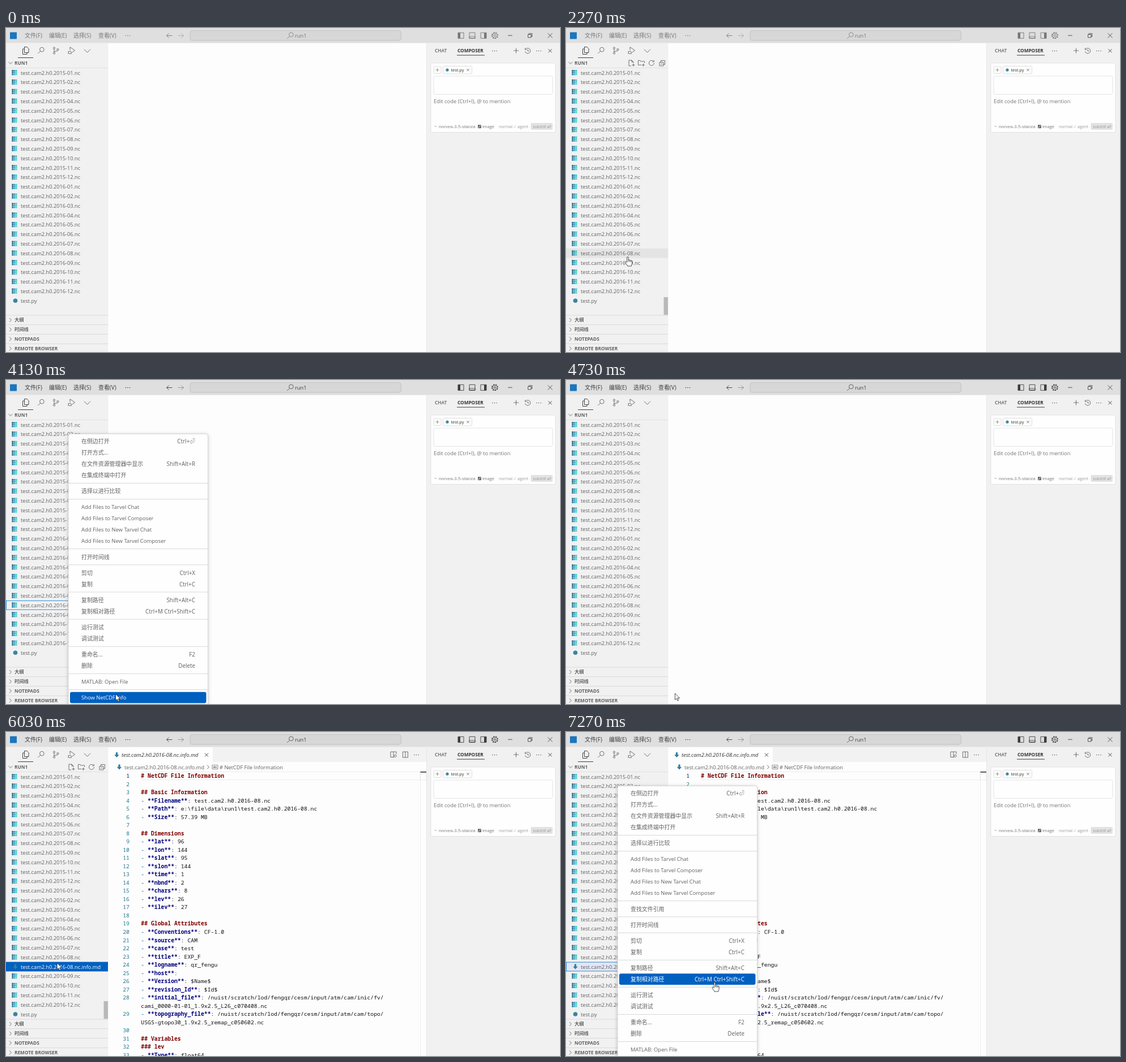
These frames come from a looping animation (978x573 px, 7.8 s). An HTML page:

```html
<!DOCTYPE html>
<html lang="zh">
<head>
<meta charset="utf-8">
<title>run1</title>
<style>
html, body { margin: 0; width: 100%; height: 100%; overflow: hidden; background: #fdfdfd; }
svg { display: block; width: 100vw; height: 100vh; color: #616161;
  font-family: "Open Sans", "Noto Sans CJK SC", "Noto Sans CJK", sans-serif; }
text { white-space: pre; fill: currentColor; }
path { stroke: currentColor; }
.mono text { font-family: "Noto Sans Mono", "DejaVu Sans Mono", monospace; color: #111; }
.head { font-weight: 700; fill: #800000; }
.key { font-weight: 700; fill: #000080; }
.dash { fill: #0451a5; }
.menu { filter: drop-shadow(0 1px 3px rgba(0, 0, 0, .2)); }
.item rect { fill: none; }
.item.on rect { fill: #0060c0; }
.item.on { color: #fff; }
</style>
</head>
<body>
<svg id="stage" viewBox="0 0 978 573">
  <defs>
    <g id="grid"></g>
    <path id="down" d="M-1.6-4.5H1.6V-.3H4.3L0 4.4-4.3-.3H-1.6z" fill="#2f7f9f" style="stroke:none"/>
  </defs>
</svg>
<script>
const LOOP = 7800, PITCH = 16.8, LINE = 14.52;

// ---------- drawing helpers (y is the middle of the text) ----------
const text = (x, y, s, size = 9.25, extra = '') =>
  `<text x="${x}" y="${y + size * .36}" font-size="${size}" ${extra}>${s}</text>`;
const rect = (x, y, w, h, fill, extra = '') =>
  `<rect x="${x}" y="${y}" width="${w}" height="${h}" fill="${fill}" ${extra}/>`;
const icon = (x, y, d, extra = '') =>
  `<path transform="translate(${x} ${y})" d="${d}" fill="none" stroke-width=".9" ${extra}/>`;
const ring = (x, y, r) => `M${x - r} ${y}a${r} ${r} 0 1 0 ${2 * r} 0a${r} ${r} 0 1 0 ${-2 * r} 0`;
const dots = (x, y) => [-3.6, 0, 3.6].map(d =>
  `<circle cx="${x + d}" cy="${y}" r=".8" fill="currentColor"/>`).join('');
const group = (id, body, extra = '') => `<g id="${id}" ${extra}>${body}</g>`;
const rowY = i => 79 + PITCH * i;
const BOLD = 'font-weight="700"', PALE = 'stroke="#d9d9d9"';

const D = {
  right: 'M-2-3.5L1.5 0-2 3.5',
  down: 'M-3.5-2L0 1.5 3.5-2',
  cross: 'M-3-3L3 3M3-3L-3 3',
  plus: 'M-4.5 0H4.5M0-4.5V4.5',
  lens: ring(1.4, -1.4, 3.8) + 'M-1.3 1.3L-5.8 5.8',
  files: 'M-2-6.5H2.5L5.5-3.5V3.5H-2zM-2-3H-5V6.5H2.5V3.5',
  branch: ring(-3, -4.5, 1.6) + ring(-3, 4.5, 1.6) + ring(3.4, -2, 1.6) + 'M-3-2.9V2.9M3.4-.4C3.4 2-3 0-3 2.9',
  debug: 'M-2-1V-6.3L6.5-.3 1.5 3.2' + ring(-2.2, 3.3, 2.4) + 'M-6 1.4L-4.3 2.4M-6 5.6L-4.3 4.4M1.4 5.6L0 4.4',
  newFile: 'M1-5H-4V5H0M1-5L4-2V0M1-5V-2H4M4 1V6M1.5 3.5H6.5',
  newFolder: 'M0 3.5H-5.5V-4.5H-2L-1-3H5.5V0M3.5 1V6M1 3.5H6',
  refresh: 'M3.8-2.5A4.5 4.5 0 1 0 4.5 0M4.3-5V-2.2H1.5',
  collapse: 'M-4.5-1.5H2.5V5H-4.5zM-2-1.5V-4.5H5V2.5H2.5M-2.5 1.7H.8',
  box: 'M-5-5H5V5H-5z',
  history: 'M-4-2.5A4.7 4.7 0 1 1-4.6 1M-4.6-5V-2.2H-1.8M0-2.6V.4H2.4',
};

// ---------- static chrome ----------
const title = () => {
  let s = [['文件(F)', 33], ['编辑(E)', 76], ['选择(S)', 119], ['查看(V)', 163]]
    .map(([l, x]) => text(x, 13.8, l, 9.93)).join('') + dots(215, 13.5);
  s += icon(288.5, 13.5, 'M5 0H-5M-1-4L-5 0-1 4') + icon(308.5, 13.5, 'M-5 0H5M1-4L5 0 1 4', 'opacity=".5"');
  s += rect(325, 4.5, 372.5, 17.5, '#d7d7d7', 'stroke="#bcbcbc" stroke-width=".8" rx="4"');
  s += icon(502, 13.2, D.lens, 'opacity=".85"') + text(510, 13.8, 'run1', 9.4);
  [803, 823, 843].forEach((x, i) => {
    s += icon(x, 13.3, D.box) + rect(...[[x - 5, 8.3, 4, 10], [x - 5, 14.8, 10, 3], [x + 1, 8.3, 4, 10]][i],
      i === 1 ? 'none' : 'currentColor', i === 1 ? 'stroke="currentColor" stroke-width=".8"' : '');
  });
  s += icon(863, 13.3, ring(0, 0, 1.7) + ring(0, 0, 4.2)) +
    icon(863, 13.3, ring(0, 0, 5.2), 'style="stroke-width:1.6;stroke-dasharray:2 2.08"');
  return s;
};

const windowButtons = icon(890, 13.2, 'M-3.8 0H3.8') +
  icon(925, 13.3, 'M-3.5-1.8H2V3.5H-3.5zM-1.8-1.8V-3.5H3.7V1.8H2') + icon(960.5, 13.3, 'M-4-4L4 4M4-4L-4 4');

const sideHead = icon(34.5, 40, D.files, 'style="color:#333"') + rect(21, 52, 27, 1, '#424242') +
  icon(62, 39.5, D.lens) + icon(88, 40, D.branch) + icon(115, 40, D.debug) +
  icon(143.5, 40.5, 'M-5.5-2.8L0 2.8 5.5-2.8') +
  icon(8, 62, D.down) + text(15, 62, 'RUN1', 8.3, BOLD) + rect(0, 70, 180, .8, '#dedede');

const sections = ['大纲', '时间线', 'NOTEPADS', 'REMOTE BROWSER'].map((l, i) => {
  const y = 516.4 + i * 16.8;
  return rect(0, y - 8.8, 180, .8, '#d4d4d4') + icon(8, y, D.right) + text(15, y, l, 8.3, BOLD);
}).join('');

const fileRow = (i, name) => `<use href="#grid" x="15" y="${rowY(i)}"/>` + text(26, rowY(i) + .3, name);
const names = Array.from({ length: 24 }, (_, i) =>
  `test.cam2.h0.${2015 + Math.floor(i / 12)}-${String(i % 12 + 1).padStart(2, '0')}.nc`);
const rows = from => names.map((n, i) => (from ? i >= 20 : i < 20) ? fileRow(i, n) : '').join('');
const pyRow = `<circle cx="16.5" cy="${rowY(24)}" r="3.8" fill="#3f81a5"/>` + text(26, rowY(24) + .3, 'test.py');
const INFO = 'test.cam2.h0.2016-08.nc.info.md';
const infoRow = `<use href="#down" x="16.5" y="${rowY(20)}"/>` + text(26, rowY(20) + .3, INFO);

const panel = rect(742, 27, 236, 546, '#f1f1f1') + rect(742, 27, .8, 546, '#e4e4e4') +
  text(757, 40.5, 'CHAT', 8.3, 'font-weight="600"') +
  text(797, 40.5, 'COMPOSER', 8.25, BOLD + ' fill="#333" style="color:#333"') +
  rect(796, 47.6, 49, 1, '#424242') + dots(862.5, 40.5) + icon(900.5, 40, D.plus) +
  icon(921, 40.3, D.history) + dots(940.5, 40.5) + icon(960.5, 40.3, D.cross, 'style="color:#333"') +
  rect(750, 62, 220, 122.5, '#fefefe', 'stroke="#dcdcdc" stroke-width=".8" rx="2"') +
  rect(755, 68, 13, 12.5, 'none', 'stroke="#d4d4d4" stroke-width=".8" rx="2"') +
  icon(761.5, 74.2, 'M-3 0H3M0-3V3', 'style="color:#888"') +
  rect(771.5, 67.5, 51, 13.5, 'none', 'stroke="#d4d4d4" stroke-width=".8" rx="2"') +
  '<circle cx="779" cy="74.2" r="2.6" fill="#3f8a9c"/>' +
  text(785.5, 74.3, 'test.py', 7.4, 'style="color:#333"') + icon(815.5, 74.2, 'M-2-2L2 2M2-2L-2 2') +
  rect(755, 85, 210, 32.5, 'none', 'stroke="#dedede" stroke-width=".8" rx="3"') +
  text(755, 129.5, 'Edit code (Ctrl+I), @ to mention', 9.4, 'style="color:#747474"') +
  '<g style="color:#999">' + icon(758.5, 174, 'M-2-1L0 1 2-1') +
  text(764, 173.8, 'norvea-3.5-stanza', 8, 'font-family="Liberation Sans, sans-serif" style="color:#858585"') +
  rect(833, 171.2, 6, 6, '#666', 'rx="1"') +
  icon(836, 174.2, 'M-2 1.8L2-1.8', 'style="color:#fff"') +
  text(841, 174.2, 'image', 7.3, 'style="color:#777"') + text(870, 174.2, 'normal', 7.2) +
  text(897, 174.2, '/', 7.2) + text(903, 174.2, 'agent', 7.2) +
  rect(926.5, 168, 38.5, 12, '#e2e2e2', 'rx="2"') + text(930, 174.2, 'submit', 7.2) +
  icon(958.5, 174.2, 'M2.5-2.5V1H-2.5M-1-.8L-2.7 1-1 2.6') + '</g>';

// ---------- editor; a leading ~ marks a wrapped row ----------
const doc = String.raw`# NetCDF File Information

## Basic Information
- **Filename**: test.cam2.h0.2016-08.nc
- **Path**: e:\file\data\run1\test.cam2.h0.2016-08.nc
- **Size**: 57.39 MB

## Dimensions
- **lat**: 96
- **lon**: 144
- **slat**: 95
- **slon**: 144
- **time**: 1
- **nbnd**: 2
- **chars**: 8
- **lev**: 26
- **ilev**: 27

## Global Attributes
- **Conventions**: CF-1.0
- **source**: CAM
- **case**: test
- **title**: EXP_F
- **logname**: qr_fengu
- **host**:
- **Version**: $Name$
- **revision_Id**: $Id$
- **initial_file**: /nuist/scratch/lod/fengqr/cesm/input/atm/cam/inic/fv/
~cami_0000-01-01_1.9x2.5_L26_c070408.nc
- **topography_file**: /nuist/scratch/lod/fengqr/cesm/input/atm/cam/topo/
~USGS-gtopo30_1.9x2.5_remap_c050602.nc

## Variables
### lev
- **Type**: float64`;

const paint = line => line[0] === '#' ? `<tspan class="head">${line}</tspan>` :
  line.replace(/^~/, '').replace(/^- (\*\*.+?\*\*)/, '<tspan class="dash">-</tspan> <tspan class="key">$1</tspan>');

const code = () => {
  let n = 0;
  return doc.split('\n').map((line, i) => {
    const y = 77.6 + i * LINE;
    const num = line[0] === '~' ? '' : text(218, y, ++n, 9.795,
      `text-anchor="end" style="color:${n === 1 ? '#0b216f' : '#237893'}"`);
    return num + text(238.3, y, paint(line), 9.795);
  }).join('');
};

const editor = () => rect(180.5, 27, 561.5, 26, '#f2f2f2') + rect(180.5, 27, 184.5, 27, '#fefefe') +
  '<use href="#down" x="195.5" y="40.5"/>' +
  text(204, 40.5, INFO, 9.4, 'font-style="italic" style="color:#333"') +
  icon(354, 40.5, D.cross, 'style="color:#333"') +
  icon(684, 40, 'M1 4.5H-5V-5H5V-1M0-5V4.5' + ring(3, 2.3, 2)) +
  icon(705, 40, 'M-4.5-5H4.5V5H-4.5zM0-5V5') + dots(724.5, 40.5) +
  '<use href="#down" x="200" y="62"/>' + text(209, 62.2, INFO) + icon(357, 62, D.right) +
  icon(369, 62, 'M-5-3.5H5V3.5H-5zM-3-.8V1.2H-1.4V-.6H-3M-.5-1.8V1.2H1V-.6H-.5M3.4-.6H2V1.2H3.4', 'style="stroke-width:.7"') +
  text(377, 62.2, '# NetCDF File Information', 9.25) +
  rect(238.5, 70.3, 492.5, 14.2, 'none', 'stroke="#ececec" stroke-width="1"') +
  group('code', code(), 'class="mono"') +
  rect(731, 70, .7, 503, '#e8e8e8') + rect(731.5, 70.5, 10.5, 14.5, 'none', 'stroke="#e6e6e6" stroke-width=".8"') +
  rect(731.5, 70, 10.5, 15, '#a9a9a9', 'id="thumb"') + rect(731.5, 70, 10.5, 1.6, '#333') +
  rect(238, 70.5, 1.5, 14, '#000', 'id="caret"');

// ---------- context menus ----------
const TOP = ['在侧边打开|Ctrl+⏎', '打开方式...', '在文件资源管理器中显示|Shift+Alt+R', '在集成终端中打开', '-',
  '选择以进行比较', '-', 'Add Files to Tarvel Chat', 'Add Files to Tarvel Composer',
  'Add Files to New Tarvel Chat', 'Add Files to New Tarvel Composer', '-'];
const REST = ['打开时间线', '-', '剪切|Ctrl+X', '复制|Ctrl+C', '-', '复制路径|Shift+Alt+C',
  '复制相对路径|Ctrl+M Ctrl+Shift+C', '-', '运行测试', '调试测试', '-', '重命名...|F2', '删除|Delete', '-',
  'MATLAB: Open File', '-', 'Show NetCDF Info'];

const makeMenu = (id, x, list) => {
  let y = 108.7, body = '';
  const mids = [];
  for (const it of list) {
    if (it === '-') {
      body += rect(x, y - 6.2, 246.5, .9, '#d4d4d4');
      y += 8.32;
      continue;
    }
    const [label, keys] = it.split('|');
    body += `<g class="item">${rect(x + 3, y - 10, 240.5, 19.9, 'none', 'rx="3"')}` +
      text(x + 23, y + .2, label, /[一-龥]/.test(label) ? 9.93 : 9.45) +
      (keys ? text(x + 224, y + .2, keys, 9.9, 'text-anchor="end"') : '') + '</g>';
    mids.push(y);
    y += 19.9;
  }
  const frame = rect(x, 95.3, 246.5, 500, '#fefefe', 'rx="4" stroke="#cfcfcf" stroke-width=".8"');
  return { id, x, mids, html: group(id, frame + body, 'class="menu"') };
};
const menus = [makeMenu('menuA', 110, [...TOP, ...REST]),
  makeMenu('menuB', 91, [...TOP, '查找文件引用', '-', ...REST])];

const HAND = 'M-1.3 9V1a1.25 1.25 0 0 1 2.5 0V5.6a1.2 1 0 0 1 2.3.4a1.2 1 0 0 1 2.2.6a1.1 1 0 0 1 2 .8V11q0 2-1.2 3.6V16H-.6V15q-1.8-1.8-3.6-5q-.9-1.6.4-2q1.2-.2 2.5 1.6zM1.2 5.6V8.5M3.5 6V8.8M5.7 6.6V9';
const ARROW = 'M0 0V11.5L2.7 9 4.5 13 6.4 12.2 4.6 8.3H8.2z';
const pointerPath = (id, d) => `<path id="${id}" d="${d}" fill="#fff" stroke-width=".8" style="stroke:#222"/>`;

// ---------- assembly ----------
const stage = document.getElementById('stage');
document.getElementById('grid').innerHTML = Array.from({ length: 9 }, (_, i) => {
  const c = i % 3, r = Math.floor(i / 3);
  return rect(-4.7 + c * 3.2, -4.8 + r * 3.2, 2.8, 2.8, `hsl(${200 - c * 9} 55% ${35 + c * 9 + r * 3}%)`);
}).join('');

stage.insertAdjacentHTML('beforeend',
  rect(0, 0, 978, 573, '#fdfdfd') + rect(0, 27, 180.5, 546, '#f1f1f1') +
  rect(0, 0, 180, PITCH, '#e4e4e4', 'id="hover"') +
  rect(0, rowY(20) - 8.4, 180, PITCH, '#e4e6f1', 'id="picked"') +
  rect(.5, 0, 179, PITCH - 1, 'none', 'id="outline" stroke="#1a85d8" stroke-width=".9"') +
  sideHead + rows(0) + group('info', infoRow) + group('tail', rows(1) + pyRow) +
  group('tools', icon(115, 62, D.newFile) + icon(133, 62, D.newFolder) + icon(151, 62, D.refresh) +
    icon(169.5, 62, D.collapse) + rect(172.5, 476, 7.5, 31.5, '#b9b9b9')) +
  sections + group('editor', editor()) + panel +
  rect(0, 0, 978, 26.6, '#dfdfdf') + rect(7, 7.5, 12, 12, '#1c76bd') +
  group('title', title()) + group('buttons', windowButtons, 'style="color:#444"') +
  menus.map(m => m.html).join('') +
  group('pointer', pointerPath('hand', HAND) + pointerPath('arrow', ARROW)));

// ---------- timeline ----------
const $ = id => document.getElementById(id);
const ui = {};
for (const id of ['hover', 'picked', 'outline', 'info', 'tail', 'tools', 'editor', 'thumb', 'caret',
  'title', 'pointer', 'hand', 'arrow']) ui[id] = $(id);
for (const m of menus) {
  m.el = $(m.id);
  m.items = [...m.el.querySelectorAll('.item')];
}

const show = (el, on) => { el.style.display = on ? '' : 'none'; };
const within = (t, a, b) => t >= a && t < b;

// time, x, y of the pointer tip
const track = [[60, 905, 590], [800, 726, 430], [970, 726, 430], [1730, 150, 402], [1770, 150, 402],
  [2200, 109, 405], [2520, 109, 405], [2800, 119, 412], [3370, 119, 412], [4050, 193.5, 555.5],
  [4700, 193.5, 555.5], [5220, 87.5, 429.5], [5400, 87.5, 429.5], [5750, 90, 408.5], [6570, 90.5, 408.5],
  [6950, 362, 446], [7250, 262.5, 443], [LOOP, 262.5, 443]];

function tipAt(t) {
  const i = track.findIndex(p => p[0] > t);
  if (i < 1) return track[0].slice(1);
  const [t0, x0, y0] = track[i - 1], [t1, x1, y1] = track[i];
  const k = (t - t0) / (t1 - t0), e = k * k * (3 - 2 * k);
  return [x0 + (x1 - x0) * e, y0 + (y1 - y0) * e];
}

const OPENED = 4800, PICKED = 5980;

function render(t) {
  const [x, y] = tipAt(t);
  const opened = t >= OPENED;
  const menu = within(t, 2460, 4190) ? menus[0] : t >= 6080 ? menus[1] : null;
  const pressed = within(t, 2380, 2520) || within(t, 4090, 4700) || within(t, PICKED, 6600);
  const inSide = !menu && x < 180;
  const row = Math.floor((y - 70.6) / PITCH);
  const onRow = inSide && row >= 0 && row < (opened ? 26 : 25);
  const active = within(t, PICKED, 6080);

  ui.title.style.color = t >= 2380 ? '#3c3c3c' : '#777';
  show(ui.tools, inSide);
  show(ui.hover, onRow);
  ui.hover.setAttribute('y', rowY(row) - 8.4);
  show(ui.info, opened);
  show(ui.picked, opened);
  ui.picked.setAttribute('fill', active ? '#0060c0' : '#e4e6f1');
  ui.info.style.color = active ? '#fff' : '';
  show(ui.outline, menu || within(t, 2380, 2460));
  ui.outline.setAttribute('y', rowY(t < OPENED ? 19 : 20) - 7.9);
  ui.tail.setAttribute('transform', `translate(0 ${opened ? PITCH : 0})`);

  show(ui.editor, opened);
  show(ui.caret, t < PICKED && (t - OPENED) % 1000 < 500);
  ui.thumb.style.opacity = Math.max(0, Math.min(1, (5900 - t) / 400));

  let onItem = false;
  for (const m of menus) {
    show(m.el, m === menu);
    m.items.forEach((el, i) => {
      const on = m === menu && x > m.x + 3 && x < m.x + 243.5 && Math.abs(y - m.mids[i]) < 9.95;
      el.classList.toggle('on', on);
      onItem = onItem || on;
    });
  }

  const hand = !pressed && (onItem || inSide);
  show(ui.pointer, t >= 60);
  show(ui.hand, hand);
  show(ui.arrow, !hand);
  ui.pointer.setAttribute('transform', `translate(${x.toFixed(2)} ${y.toFixed(2)})`);
}

const start = performance.now();
function tick(now) {
  render(Math.max(0, now - start) % LOOP);
  requestAnimationFrame(tick);
}
render(0);
requestAnimationFrame(tick);
</script>
</body>
</html>
```
